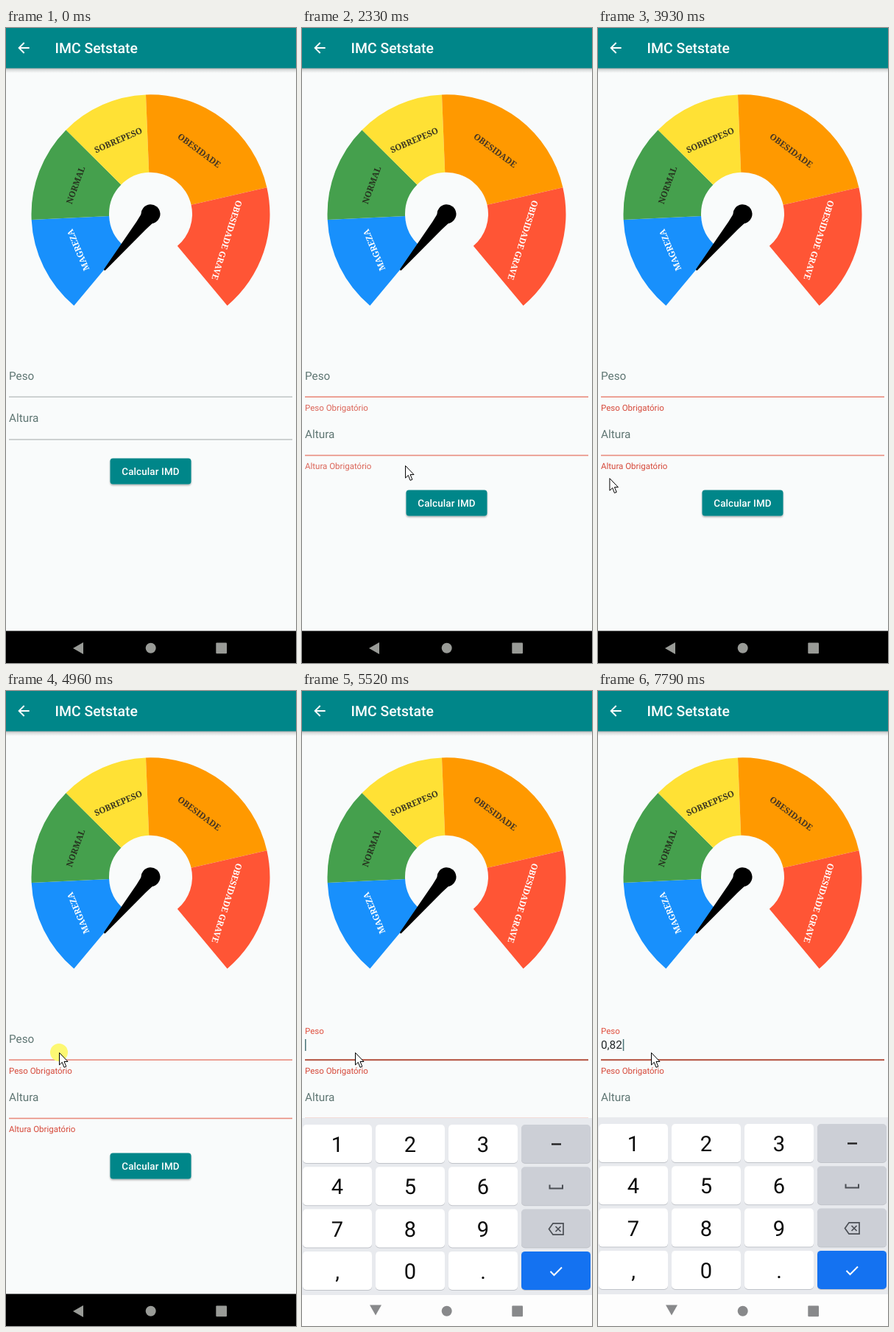
Write an HTML page that moves like this. It is 394 px wide and 861 px high and loops after 8 s.

```html
<!DOCTYPE html>
<html lang="pt">
<head>
<meta charset="utf-8">
<title>IMC</title>
<style>
html, body { margin: 0; width: 100%; height: 100%; overflow: hidden; background: #f9fbfb; }
svg { display: block; width: 394px; height: 861px; }
text { font-family: Roboto, sans-serif; text-rendering: geometricPrecision; }
.medium { font-weight: 500; fill: #fff; }
.field { font-size: 15.3px; fill: #5f7673; }
.small { font-size: 11.5px; fill: #d6493a; }
.dial text { font: bold 11.5px "Noto Serif", serif; text-anchor: middle; }
.digit { font-size: 29px; text-anchor: middle; fill: #0b0b0b; }
.icon { fill: none; stroke: #4b4f55; stroke-width: 2; }
</style>
</head>
<body>
<svg viewBox="0 0 394 861" xmlns="http://www.w3.org/2000/svg">
  <defs>
    <linearGradient id="shade" x2="0" y2="1">
      <stop stop-color="#000" stop-opacity=".34"/>
      <stop offset=".4" stop-color="#000" stop-opacity=".12"/>
      <stop offset="1" stop-color="#000" stop-opacity="0"/>
    </linearGradient>
    <filter id="soft" x="-10%" y="-20%" width="120%" height="150%">
      <feDropShadow dx="0" dy="1.5" stdDeviation="1.2" flood-opacity=".35"/>
    </filter>
  </defs>
  <rect width="394" height="861" fill="#f9fbfb"/>
  <rect y="54" width="394" height="7" fill="url(#shade)"/>
  <rect width="394" height="54.5" fill="#008689"/>
  <path transform="translate(12.5 15.5) scale(.958)" fill="#fff" d="M20 11H7.83l5.59-5.59L12 4l-8 8 8 8 1.41-1.41L7.83 13H20z"/>
  <text class="medium" x="66.5" y="34.3" font-size="19.4">IMC Setstate</text>

  <g id="dial" class="dial"></g>
  <g transform="translate(196.5 252.3) rotate(129.6)">
    <path d="M0-11L20-8.2L98-1.2Q100 0 98 1.2L20 8.2L0 11z"/>
    <circle r="13"/>
  </g>

  <text id="weightLabel" class="field" x="4"></text>
  <text id="weightValue" class="field" x="4" y="485" style="fill:#24282a">0,82</text>
  <rect id="caret" y="472" width="1.5" height="16" fill="#4a7478"/>
  <rect id="weightLine" x="4" width="385"/>
  <text id="weightError" class="small" x="4">Peso Obrigatório</text>
  <g id="height">
    <text class="field" x="4" y="534">Altura</text>
    <rect id="heightLine" x="4" y="557.2" width="385" height="1.6"/>
  </g>
  <text id="heightError" class="small" x="4">Altura Obrigatório</text>
  <g id="button">
    <rect x="141.5" y="583.5" width="110" height="35" rx="3.8" fill="#008689" filter="url(#soft)"/>
    <text class="medium" x="196.5" y="606" font-size="13.4" letter-spacing=".12" text-anchor="middle">Calcular IMD</text>
  </g>

  <rect id="navBar" y="817.5" width="394" height="44"/>
  <g id="keyboard">
    <rect y="578" width="394" height="290" fill="#fdfdfd"/>
    <rect y="578" width="394" height="240" fill="#e8eaee"/>
    <g id="keys"></g>
    <g class="icon">
      <path d="M339 613.5H352" stroke-width="2.4" stroke="#222"/>
      <path d="M336.500 668.500V673.500H354V668.500"/>
      <path d="M341 720.800H355V736.200H341L335.500 728.500zM344.500 725L351.500 732M351.500 725L344.500 732" stroke-width="1.7"/>
      <path d="M337.500 786L342.500 791L353 780.500" stroke="#fff"/>
    </g>
  </g>
  <g id="navIcons">
    <path id="back"/>
    <circle cx="196.7" cy="840.8" r="7"/>
    <rect x="285.300" y="833.500" width="14.700" height="14.700" rx="1"/>
  </g>

  <g id="pointer">
    <circle id="press" r="12" fill="#fdf873"/>
    <path d="M.5 .5V17L4.300 13.400L7 20.300L9.800 19.100L7 12.500H12z" fill="#fff" stroke="#000"/>
  </g>
</svg>
<script>
const LOOP = 8000;
const el = id => document.getElementById(id);
const set = (id, attrs) => {
  for (const name in attrs) el(id).setAttribute(name, attrs[name]);
};
const show = (id, on) => set(id, { opacity: +on });
const progress = (t, start, duration) => Math.min(1, Math.max(0, (t - start) / duration));
const mix = (a, b, p) => a + (b - a) * p;
const easeOut = p => 1 - (1 - p) ** 3;

// Each sector: start angle, end angle, fill, label, label colour, label x, y, rotation
const sectors = [
  [130, 177.3, '#1890fc', 'MAGREZA', '#fff', 98, 301, -113],
  [177.3, 224.8, '#45a04d', 'NORMAL', '#26331f', 94.5, 213, -70],
  [224.8, 267.7, '#ffe135', 'SOBREPESO', '#3b3720', 152.5, 152, -23.5],
  [267.7, 347.1, '#ff9900', 'OBESIDADE', '#443524', 262.5, 166, 36.5],
  [347.1, 410, '#ff5535', 'OBESIDADE GRAVE', '#fff', 300, 287.5, 107.5]
];

function polar(radius, degrees) {
  const a = degrees * Math.PI / 180;
  return `${196.5 + radius * Math.cos(a)} ${252.3 + radius * Math.sin(a)}`;
}

el('dial').innerHTML = sectors.map(([from, to, fill, label, ink, x, y, turn]) =>
  `<path fill="${fill}" d="M${polar(162, from)}A162 162 0 0 1 ${polar(162, to)}` +
  `L${polar(56.5, to)}A56.5 56.5 0 0 0 ${polar(56.5, from)}z"/>` +
  `<text transform="translate(${x} ${y}) rotate(${turn})" y="4.1" style="fill:${ink}">${label}</text>`
).join('');

el('keys').innerHTML = ['123-', '456_', '789<', ',0.>'].map((row, r) =>
  [...row].map((key, c) => {
    const x = 1 + c * 99, y = 587 + r * 57.3;
    const fill = c < 3 ? '#fff' : r < 3 ? '#cccfd6' : '#1472f1';
    const digit = c < 3 ? `<text class="digit" x="${x + 47}" y="${y + 37}">${key}</text>` : '';
    return `<rect x="${x}" y="${y + 1}" width="94" height="52" rx="5" fill="#c0c3c9"/>` +
      `<rect x="${x}" y="${y}" width="94" height="52" rx="5" fill="${fill}"/>${digit}`;
  }).join('')
).join('');

// Pointer stops: time, x, y
const route = [
  [250, 300, 798], [600, 205, 610], [1010, 109, 479], [1220, 45, 473], [1430, 28, 477],
  [1500, 29, 481], [1650, 66, 535], [1850, 173, 601], [1920, 186, 614], [2190, 186, 614],
  [2500, 85, 568], [2790, 32, 525], [2980, 21, 524], [3120, 48, 527], [3250, 74, 531],
  [3450, 72, 536], [3700, 30, 585], [3850, 3, 601], [4000, 26, 618], [4130, 50, 611],
  [4260, 47, 598], [4600, 58, 545], [4880, 72, 490], [LOOP, 72, 490]
];

function pointerAt(t) {
  const i = Math.max(1, route.findIndex(stop => stop[0] > t));
  const [t0, x0, y0] = route[i - 1], [t1, x1, y1] = route[i];
  const p = progress(t, t0, t1 - t0);
  return [mix(x0, x1, p), mix(y0, y1, p)];
}

const between = (t, a, b) => t >= a && t < b;

function draw(t) {
  const invalid = t >= 2190, focused = t >= 5100, typed = t >= 7390;
  const errorIn = progress(t, 2190, 167);
  const float = easeOut(progress(t, 5100, 190));
  const rise = easeOut(progress(t, 5190, 390));
  const keyboardUp = rise > 0;
  const lineColor = invalid ? '#e98b7d' : '#c3c8c8';

  el('weightLabel').textContent = 'Peso';
  el('weightLabel').style.fontSize = mix(15.3, 11.5, float) + 'px';
  el('weightLabel').style.fill = focused ? '#e0503f' : '#5f7673';
  set('weightLabel', { y: mix(476.7, 464.7, float) });
  set('weightLine', {
    y: focused ? 499.2 : 499.4, height: focused ? 2 : 1.6,
    fill: focused ? '#b4513f' : lineColor
  });
  set('heightLine', { fill: lineColor });
  set('weightError', { y: mix(516, 519, errorIn), opacity: errorIn });
  set('heightError', { y: mix(595, 598, errorIn), opacity: errorIn });
  set('height', { transform: `translate(0 ${invalid ? 21.5 : 0})` });
  set('button', { transform: `translate(0 ${invalid ? 43 : 0})` });

  show('weightValue', typed);
  show('caret', focused && !between(t, 5690, 6190) && !between(t, 6720, 7190));
  set('caret', { x: typed ? 33.8 : 4 });

  show('keyboard', keyboardUp);
  set('keyboard', { transform: `translate(0 ${mix(283, 0, rise)})` });
  set('navBar', { fill: keyboardUp ? '#fdfdfd' : '#000' });
  set('navIcons', { fill: keyboardUp ? '#88898b' : '#999b97' });
  set('back', { d: keyboardUp ? 'M92 832.5H108L100 846.5z' : 'M105 833V849L91 841z' });

  show('pointer', t >= 250);
  set('pointer', { transform: `translate(${pointerAt(t)})` });
  show('press', between(t, 1920, 2190) || between(t, 4890, 5100));
}

const start = performance.now();
function tick(now) {
  draw(Math.max(0, now - start) % LOOP);
  requestAnimationFrame(tick);
}
draw(0);
requestAnimationFrame(tick);
</script>
</body>
</html>
```
